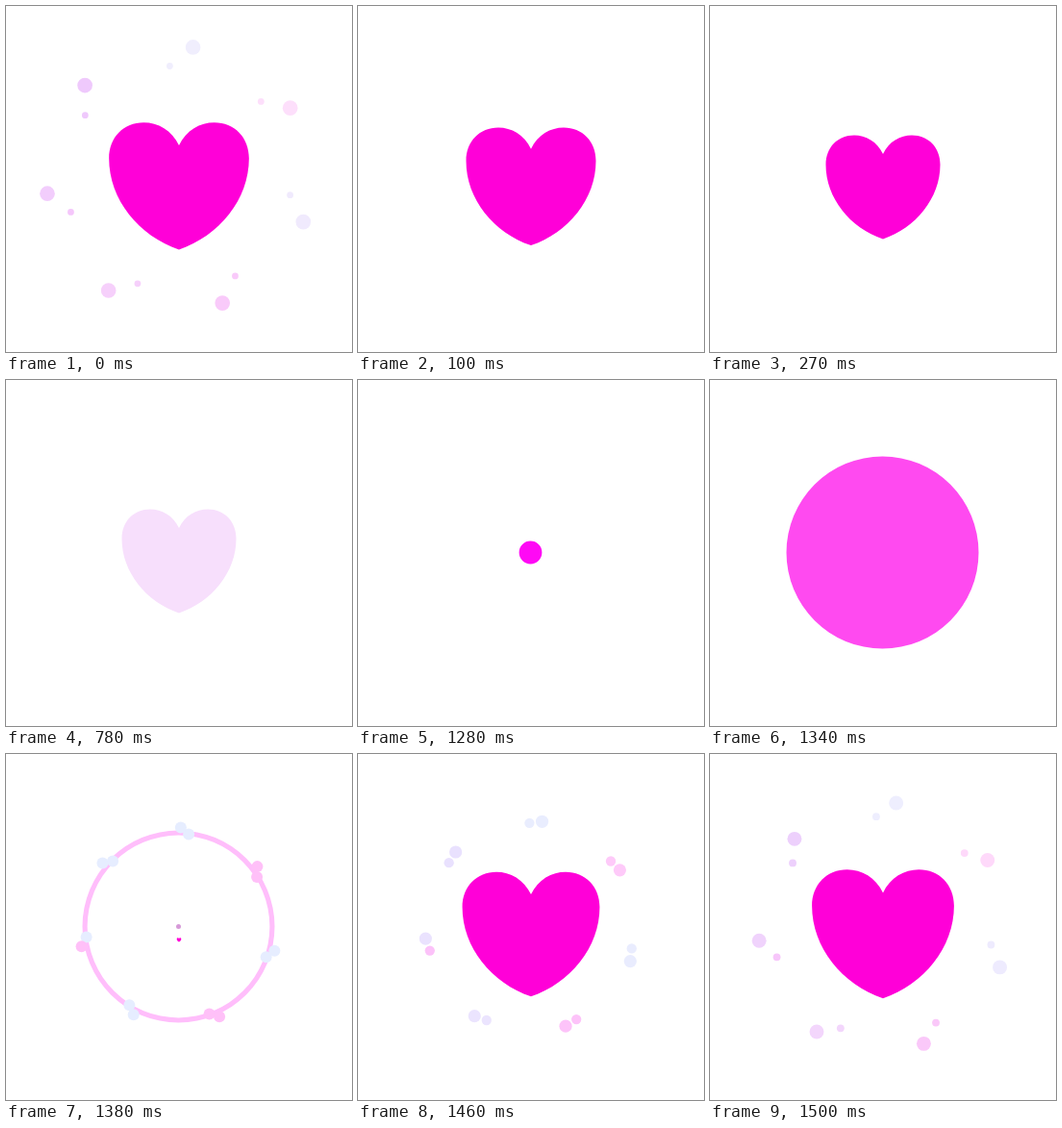
Recreate the animation shown at these times as an HTML page with a canvas. Size 360 px wide and 360 px high, loop 1520 ms.

```html
<!DOCTYPE html>
<html lang="en">
<head>
<meta charset="utf-8">
<title>Heart burst</title>
<style>
html, body { margin: 0; height: 100%; overflow: hidden; background: #fff; }
canvas { display: block; }
</style>
</head>
<body>
<canvas id="stage" width="360" height="360"></canvas>
<script>
const ctx = document.getElementById('stage').getContext('2d');
const LOOP = 1520, BURST = 1280, C = 179.5, TAU = Math.PI * 2;
const PINK = '#ff00d8', PALE = '#f7dffc';
const heart = new Path2D(`M180 154C174 141 162 134.5 150 134.5C133 134.5 120.5 147 120.5 165
  C120.5 200 146 231 180 242.5C214 231 239.5 200 239.5 165C239.5 147 227 134.5 210 134.5
  C198 134.5 186 141 180 154Z`);

const BLUE = [230, 237, 255], ROSE = [255, 192, 248];
const startTint = [BLUE, ROSE, BLUE, ROSE, BLUE, BLUE, BLUE];
const endTint = [[242, 238, 253], [253, 228, 251], [241, 234, 253], [248, 204, 250],
  [248, 204, 250], [244, 200, 251], [240, 196, 251]];

const span = (t, from, to) => Math.min(1, Math.max(0, (t - from) / (to - from)));
const lerp = (a, b, k) => a + (b - a) * k;
const mix = (a, b, k) => `rgb(${a.map((v, i) => Math.round(lerp(v, b[i], k)))})`;
const easeOut = u => 1 - (1 - u) ** 3;
const smooth = u => u * u * (3 - 2 * u);

function disc(x, y, r, color) {
  ctx.fillStyle = color;
  ctx.beginPath();
  ctx.arc(x, y, r, 0, TAU);
  ctx.fill();
}

function drawHeart(scale, color) {
  ctx.save();
  ctx.translate(180, 193.6);
  ctx.scale(scale, scale);
  ctx.translate(-180, -193.6);
  ctx.fillStyle = color;
  ctx.fill(heart);
  ctx.restore();
}

// A disc grows, then hollows out into a thinning ring.
function drawBubble(t) {
  const grow = easeOut(span(t, 1277.4, 1340.4));
  const thin = easeOut(span(t, 1340.4, 1403.4));
  if (thin === 1) return;
  const r = 100 * grow, width = r * (1 - thin);
  ctx.fillStyle = thin ? mix([255, 74, 240], [255, 196, 252], thin)
    : mix([255, 0, 246], [255, 74, 240], grow);
  ctx.beginPath();
  ctx.arc(C, C, r, 0, TAU);
  ctx.arc(C, C, r - width, 0, TAU, true);
  ctx.fill();
}

function drawDots(t) {
  if (t < 1361) return;
  const k = smooth(span(t, 1410, 1552));
  ctx.globalAlpha = span(t, 1361, 1380) * (1 - span(t, 1525, 1580));
  if (t < 1400) disc(C, C, 2.5, '#d69ad8');
  for (let i = 0; i < 7; i++) {
    const dot = (angle, dist, r, from) => {
      const a = (angle + i * 360 / 7) * Math.PI / 180;
      disc(C + dist * Math.sin(a), C - dist * Math.cos(a), r, mix(from, endTint[i], k));
    };
    dot(6.3, lerp(96.5, 143.5, k), lerp(6, 8.1, k), startTint[i]);
    dot(lerp(1.3, -5.3, k), lerp(103, 119.5, k), lerp(6, 3, k), i === 5 ? ROSE : startTint[i]);
  }
  ctx.globalAlpha = 1;
}

function heartScale(t) {
  return t < 1480 ? 1.26 * Math.sin(span(t, 1378, 1480) * Math.PI / 2)
    : lerp(1.26, 1, span(t, 1480, 1770));
}

function draw(now) {
  const t = now % LOOP;
  ctx.clearRect(0, 0, 360, 360);
  if (t >= 780 && t < BURST) {
    drawHeart(1, PALE);
  } else {
    const b = t < BURST ? t + LOOP : t;
    drawBubble(b);
    drawDots(b);
    drawHeart(heartScale(b), PINK);
  }
}

let start;
function tick(now) {
  start ??= now;
  draw(now - start);
  requestAnimationFrame(tick);
}
draw(0);
requestAnimationFrame(tick);
</script>
</body>
</html>
```
